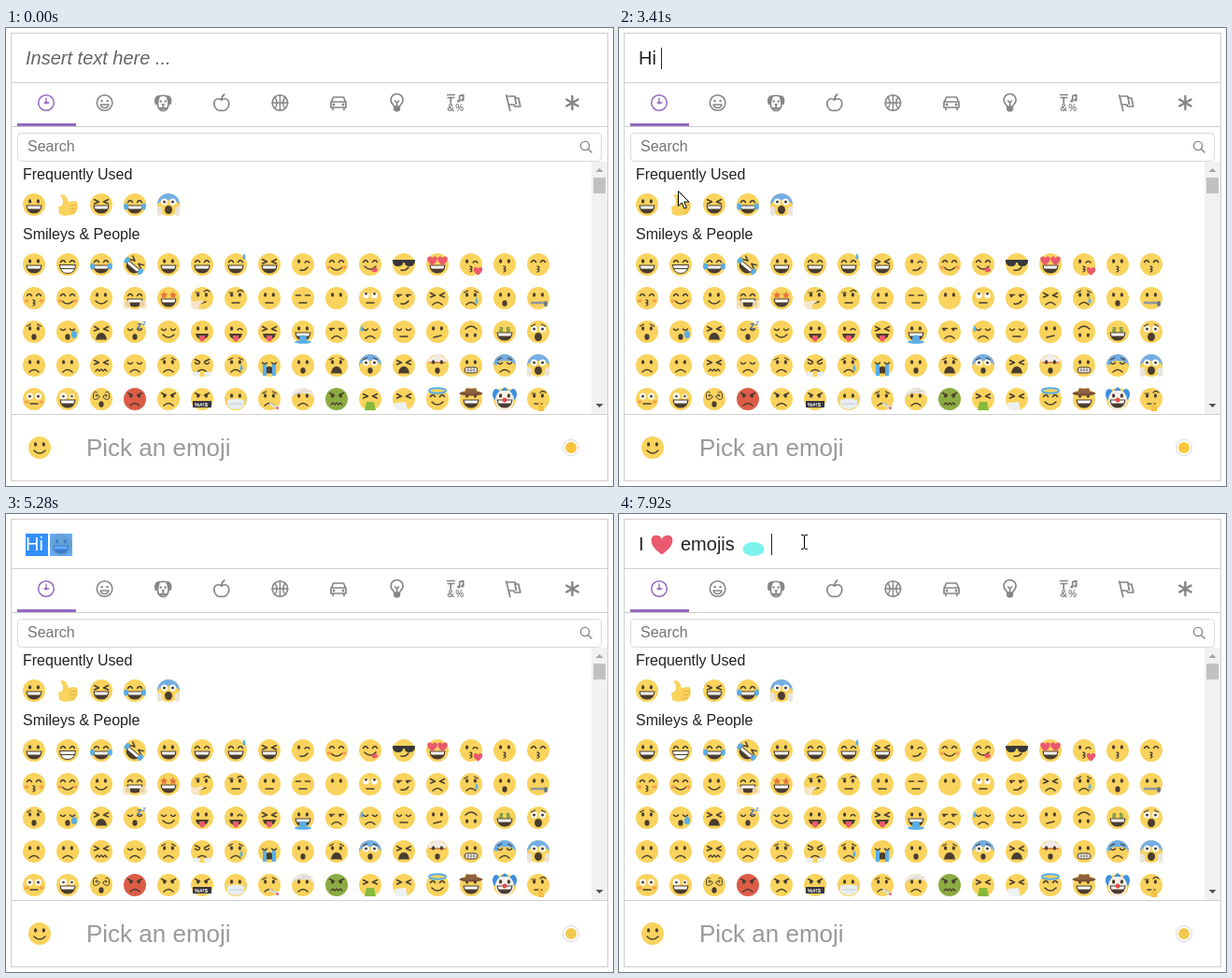
These frames come from a looping animation (650 px wide and 490 px high, 8000 ms). An HTML page:

```html
<!DOCTYPE html>
<html lang="en">
<head>
<meta charset="utf-8">
<title>Emoji picker</title>
<style>
  html, body { margin: 0; width: 100%; height: 100%; overflow: hidden; background: #fff; }
  svg { display: block; }
  text { font-family: "Liberation Sans", Arial, sans-serif; white-space: pre; }
</style>
</head>
<body>
<svg id="stage" width="650" height="490" viewBox="0 0 650 490"><g id="panel"></g><g id="live"></g></svg>
<script>
const INK = '#4a3d30', SKIN = '#f9d35d', BLUE = '#5aaee8', RED = '#ea596e', GOLD = '#dca63c', PALE = '#f6e6c8', WHITE = '#fff';

// Drawing helpers
const shape = (d, c = INK) => `<path d="${d}" fill="${c}"/>`;
const line = (d, w = 1.5, c = INK) =>
  `<path d="${d}" fill="none" stroke="${c}" stroke-width="${w}" stroke-linecap="round" stroke-linejoin="round"/>`;
const oval = (x, y, rx, ry = rx, c = INK) => `<ellipse cx="${x}" cy="${y}" rx="${rx}" ry="${ry}" fill="${c}"/>`;
const rect = (x, y, w, h, c) => `<rect x="${x}" y="${y}" width="${w}" height="${h}" fill="${c}"/>`;
const text = (x, y, size, c, s, more = '') => `<text x="${x}" y="${y}" font-size="${size}" fill="${c}" ${more}>${s}</text>`;
const at = (x, y, s, k = 1, turn = 0) => `<g transform="translate(${x} ${y}) rotate(${turn}) scale(${k})">${s}</g>`;
const both = s => s + `<g transform="scale(-1 1)">${s}</g>`;
const drop = (x, y) => shape(`M${x} ${y}c5 9-5 9 0 0z`, BLUE);
const heart = (x, y, k) => at(x, y, shape('M0 10C-14 1-12-9-6-9-3-9-1-8 0-5 1-8 3-9 6-9 12-9 14 1 0 10Z', RED), k);
const star = shape('M0-4L1.2-1.3 4-1 2 1 2.6 4 0 2.5-2.6 4-2 1-4-1-1.2-1.3Z', '#e8743a');
const mouth = 'M-8.5 .5H8.5Q8 9.5 0 9.5T-8.5 .5Z';

const parts = {
  // heads
  yellow: oval(0, 0, 12, 12, SKIN),
  red: oval(0, 0, 12, 12, '#dc5c47'),
  green: oval(0, 0, 12, 12, '#8cab42'),
  cold: shape('M-12 0A12 12 0 0 1 12 0Q9-5 0-5T-12 0Z', '#74aee6'),
  // eyes and brows
  dots: both(oval(4.4, -3.6, 1.6, 2.2)),
  arcs: line('M-7.5-2.5q2.5-4 5 0M2.5-2.5q2.5-4 5 0'),
  shut: line('M-7.5-3q2.5 3 5 0M2.5-3q2.5 3 5 0'),
  flat: line('M-7.5-3h5M2.5-3h5'),
  squint: line('M-7.5-5.5l5 2.5-5 2M7.5-5.5l-5 2.5 5 2'),
  wink: oval(-4.4, -3.4, 1.6, 2.2) + line('M2-2q2.5-3 5 0'),
  wide: both(oval(4.5, -3, 3.4, 3.4, WHITE) + oval(4.5, -3, 1.5)),
  odd: oval(-4.5, -3, 3.8, 3.8, WHITE) + oval(4.5, -3, 2.6, 2.6, WHITE) + both(oval(4.5, -3, 1.3)),
  roll: both(oval(4.5, -3, 3.2, 3.2, WHITE) + oval(4.5, -4.7, 1.4)),
  side: line('M-7.5-3.5h5M2.5-3.5h5') + oval(-5.8, -2.2, 1.4) + oval(4, -2.2, 1.4),
  spiral: both(line('M4.5-3q1.5 1 1.5-1t-3 0 1.5 4 4-4-4-3', 1)),
  cash: both(text(1.5, 0, 8, '#46843e', '$', 'font-weight="bold"')),
  hearts: both(heart(5.5, -4, 0.5)),
  stars: both(at(4.8, -3.5, star)),
  shades: shape('M-12-5H12V-3Q11 2 6 2T1-2H-1Q-1 2-6 2T-12-3Z', '#37373b'),
  mad: both(line('M7.5-6.5l-5 2.5')),
  sad: both(line('M7.5-6l-4-2', 1.2)),
  brow: line('M-7-6h4M2-7q3-3 6 0', 1.2),
  // mouths
  grin: shape(mouth) + shape('M-7.3 1.4H7.3L6.4 4.4H-6.4Z', WHITE),
  teeth: shape(mouth, WHITE) + line(mouth + 'M-7.5 4.5H7.5', 1),
  smile: line('M-6 3q6 6 12 0'),
  frown: line('M-5 7q5-5 10 0'),
  level: line('M-4 5h8'),
  smirk: line('M-3 6q5 1 8-3'),
  slant: line('M-4 6l8-2'),
  kiss: line('M-1 2q4 1 0 3q4 1 0 3', 1.3),
  round: oval(0, 5.5, 2.6, 3.2),
  big: oval(0, 5.5, 4, 4.5),
  wail: shape('M-6 8.5Q-5 1 0 1T6 8.5Z'),
  tongue: shape('M-7 2H7Q6 8 0 8T-7 2Z') + shape('M-3 4h6v4q-3 5-6 0z', RED),
  lick: line('M-6 2q6 6 12 0') + shape('M1 5l5-2q4 4 0 5t-5-3z', RED),
  grit: `<rect x="-7" y="2" width="14" height="6" rx="3" fill="#fff" stroke="${INK}"/>` + line('M-6 5H6M-3 2.5v5M0 2.5v5M3 2.5v5', 0.6),
  wave: line('M-6 6l2-2 2 2 2-2 2 2 2-2 2 2', 1.3),
  zip: line('M-7 5H6', 2.4, '#8c98a1') + oval(8, 6, 2, 3, '#6c7982'),
  // extras
  blush: both(oval(8, 3, 2.6, 1.8, '#f5a04e')),
  tears: both(oval(9.5, 2, 2.4, 3.6, BLUE)),
  streams: both(rect(3, -1, 4, 12, BLUE)),
  tear: drop(6, -1),
  sweat: drop(9, -12),
  drip: drop(-9, -7),
  drool: oval(0, 7.5, 4, 4, BLUE) + oval(0, 11, 9, 1.8, BLUE),
  bubble: oval(7, 3, 3, 4, BLUE),
  zzz: text(2, -3, 11, '#4870b9', 'z', 'font-weight="bold"') + text(8, -7, 8, '#4870b9', 'z'),
  love: heart(7.5, 7, 0.45),
  hug: both(oval(9, 7, 4, 4.5, PALE) + line('M7 5v4M9 4v4', 0.7, GOLD)),
  think: shape('M-11 3L-7 4-3 2 2 4-3 7Q-2 12-6 12T-12 8Z', PALE),
  puff: both(oval(6, 9, 4, 2.6, '#e9eef2')),
  burst: shape('M-9-3Q-12-9-5-9-4-14 0-12 4-14 5-9 12-9 9-3Z', '#f1ece8') + line('M-8-3H8', 2, '#d98b4f'),
  palms: both(oval(9.5, 7, 2.8, 5, '#e9e3da')),
  censor: rect(-10, 2, 20, 7, '#35353a') + text(-8, 8, 6, WHITE, '%#!$', 'font-weight="bold"'),
  mask: shape('M-9 1Q0-2 9 1V7Q0 15-9 7Z', '#e8eef1') + line('M-12-1L-9 2M12-1L9 2M-7 5H7', 0.8, '#b7c5cf'),
  stick: line('M1 5L9 10', 2.2, '#d7dfe4') + oval(8.5, 9.7, 1.4, 1.4, RED),
  bandage: shape('M-12-2Q-10-12 0-12T12-2L7-6H-7Z', '#eeeae5') + line('M-10-4L4-11M-6-6L9-9', 0.7, '#cfc8c0'),
  sick: shape('M-4 3h8l2 9h-12z', '#86ba3c'),
  tissue: shape('M-10 4L2 3 4 12-8 12Z', '#edf1f3'),
  halo: `<ellipse cy="-9" rx="9" ry="2.7" fill="none" stroke="${BLUE}" stroke-width="2"/>`,
  hat: oval(0, -6, 12.5, 2.4, '#7b5138') + shape('M-7-6L-5-12Q0-10 5-12L7-6Z', '#8f6142'),
  clown: both(oval(9, -5, 4, 6, '#3f8fe0')) + oval(0, 1, 10, 11, '#f7efe8') + shape('M-4-9L0-13 4-9Z', '#3f8fe0'),
  nose: oval(0, 1, 2.5, 2.5, '#e34b4b'),
  hush: shape('M0 3h3v4q5 1 3 6h-6z', '#f4c249'),
  thumb: shape('M-10 2Q-6 2-5-2-5-8-8-10-4-13-1-8L1-3 8-4Q12-3 10 0 12 2 10 4 11 7 8 8 8 11 4 11L-4 12-9 10Z', SKIN)
    + line('M3 1L10 0M3 4.5L10 4M3 8L8 8', 0.8, GOLD)
};

// One emoji per entry: name, then parts; a leading head replaces the yellow one
const rows = `grinning_face dots grin,grin arcs teeth,joy arcs grin tears,rofl squint grin tears tilt,smiley dots grin,smile arcs grin,sweat_smile arcs grin sweat,laughing squint grin,wink wink smirk,blush arcs smile blush,yum arcs lick,sunglasses shades smirk,heart_eyes grin hearts,kissing_heart wink kiss love,kissing dots kiss,kissing_smiling_eyes arcs kiss
kissing_closed_eyes arcs kiss blush,relaxed arcs smile blush,slightly_smiling_face dots smile,hugging_face arcs grin hug,star_struck stars grin,thinking_face dots brow slant think,raised_eyebrow dots brow level,neutral_face dots level,expressionless flat level,no_mouth dots,rolling_eyes roll level,smirk side smirk,persevere squint frown,disappointed_relieved dots sad frown tear,open_mouth dots round,zipper_mouth dots zip
hushed dots sad round,sleepy shut round bubble,tired_face squint wail,sleeping shut round zzz,relieved shut smile,stuck_out_tongue dots tongue,winking_tongue wink tongue,squinting_tongue squint tongue,drooling_face dots grin drool,unamused side frown,sweat shut frown drip,pensive shut level,confused dots slant,upside_down dots smile flip,money_mouth cash grin,astonished wide sad big
frowning dots frown,slightly_frowning dots frown,confounded squint wave,disappointed shut frown,worried dots sad frown,triumph shut mad frown puff,cry dots sad frown tear,sob shut wail streams,frowning_open dots round,anguished dots sad wail,fearful cold wide sad round,weary squint wail,exploding_head burst dots round,grimacing dots grit,cold_sweat cold shut sad frown drip,scream cold wide big palms
flushed wide level blush,zany_face odd grin,dizzy_face spiral round,red rage dots mad frown,angry dots mad frown,cursing_face dots mad censor,mask dots mask,thermometer_face dots sad frown stick,head_bandage dots frown bandage,green nauseated_face dots mad wave,vomiting_face squint sick,sneezing_face squint tissue,innocent arcs smile halo,cowboy dots grin hat,clown_face clown dots grin nose,lying dots brow level hush`
  .split('\n').map(r => r.split(','));

const faces = {};
const cells = [];
rows.forEach((row, j) => row.forEach((entry, i) => {
  const words = entry.split(' ');
  const head = /^(red|green) /.test(entry) ? words.shift() : 'yellow';
  const name = words.shift();
  const turn = words.includes('tilt') ? 40 : words.includes('flip') ? 180 : 0;
  faces[name] = at(0, 0, [head, ...words].map(w => parts[w] || '').join(''), 1, turn);
  cells.push([name, 30 + 36 * i, 253 + 36 * j]);
}));
faces.thumbs_up = parts.thumb;
['grinning_face', 'thumbs_up', 'laughing', 'joy', 'scream'].forEach((n, i) => cells.push([n, 30 + 36 * i, 189]));

// Category tabs
const GREY = '#858585', PURPLE = '#9469c2';
const ring = (c, w) => `<circle r="8.3" fill="none" stroke="${c}" stroke-width="${w}"/>`;
const gl = (d, w = 1.7) => line(d, w, GREY);
const gd = (x, y, r = 1.2) => oval(x, y, r, r, GREY);
const icons = [
  ring(PURPLE, 1.5) + line('M0-5V0M-2 0H3', 1.3, PURPLE) + oval(0, 0, 1.4, 1.4, PURPLE),
  ring(GREY, 1.6) + both(gd(3, -2)) + gl('M-4.5 2H4.5Q3.5 5.5 0 5.5T-4.5 2Z', 1.4),
  gl('M-4-7Q0-8.5 4-7Q7 1 5 5 3 8.5 0 8.5T-5 5Q-7 1-4-7M-2.5 5.5Q0 7 2.5 5.5M0 3V5')
    + both(shape('M4-8Q10-8 9 0 8 4 6 1Z', GREY) + gd(2.5, -1.5)) + shape('M-2 1H2L0 4Z', GREY),
  gl('M0-3C-5-6-8-3-8 1S-4 10 0 8C4 10 8 5 8 1S5-6 0-3Q0-7 3-9'),
  ring(GREY, 1.6) + gl('M-8 0H8M0-8V8M-5.5-6Q-1 0-5.5 6M5.5-6Q1 0 5.5 6', 1.4),
  gl('M-8 5V0L-5.5-6H5.5L8 0V5ZM-8-1H8M-6 5V7.5M6 5V7.5') + both(gd(5, 2, 1.4)),
  gl('M-3 4C-3 2-6.5 1-6.5-3A6.5 6.5 0 0 1 6.5-3C6.5 1 3 2 3 4ZM0 3V0L-2-2M0 0L2-2') + shape('M-3.5 4H3.5V8L1.5 9.5H-1.5L-3.5 8Z', GREY),
  gl('M-8.5-8.5H-1M-8-5.5H-1.5M-5-5V0M4.5-2V-7.5L8.5-8.5V-3') + gd(3.5, -2, 1.6) + gd(7.5, -3, 1.6)
    + text(-9, 9, 11, GREY, '&amp;', 'font-weight="bold"') + text(0, 9, 10, GREY, '%', 'font-weight="bold"'),
  gl('M-8-8L-4 8.5M-7.5-7H1L2-5H5L7 4H1L0 2H-5.5M1-7L2.5 1.5'),
  gl('M0-7V7M-6.2-3.5L6.2 3.5M6.2-3.5L-6.2 3.5', 2.4)
];

const EDGE = '#cfcfcf';
panel.innerHTML = `<rect x="5.5" y="5.5" width="639" height="479" fill="#fff" stroke="${EDGE}"/>`
  + [58, 105, 413].map(y => rect(6, y, 638, 1, EDGE)).join('')
  + rect(12, 102, 63, 3, PURPLE)
  + icons.map((s, i) => at(43 + 62.6 * i, 80, s)).join('')
  + `<rect x="12.5" y="112.5" width="625" height="30" rx="4" fill="#fff" stroke="#d9d9d9"/>`
  + text(23, 132, 16, '#757575', 'Search')
  + `<circle cx="620" cy="126" r="4.6" fill="none" stroke="${GREY}" stroke-width="1.3"/>` + gl('M623.5 129.5L627 133', 1.5)
  + text(18, 162, 16, '#222', 'Frequently Used') + text(18, 226, 16, '#222', 'Smileys &amp; People')
  + rect(627, 143, 17, 270, '#f1f1f1') + rect(629, 160, 13, 17, '#c1c1c1')
  + shape('M631.5 154L635.5 150 639.5 154Z', '#a3a3a3') + shape('M631.5 402L635.5 406 639.5 402Z', '#505050')
  + cells.map(([n, x, y]) => at(x, y, faces[n])).join('');

// Pointer path: time, x, y
const path = [
  [80, 330, 385], [310, 300, 200], [690, 256, 34], [840, 256, 34], [850, 262, 37], [2940, 262, 37],
  [2950, 250, 40], [3200, 130, 100], [3410, 63, 174], [3730, 31, 190], [4180, 31, 190], [4190, 50, 168],
  [4265, 90, 129], [4500, 100, 60], [4960, 74, 30], [5050, 60, 27], [5280, -10, 18], [6590, -10, 24],
  [6600, 12, 24], [6990, 110, 22], [7215, 159, 23], [7380, 185, 26], [7900, 198, 30], [8000, 198, 30]
];
const last = (list, t) => list.filter(s => s <= t).pop();

function stepped(t) {
  const start = last([0, 80, 850, 2950, 4190, 5050, 6600], t);
  return start + Math.floor((t - start) / 77.2 + 0.1) * 77.2;
}
function pointer(t) {
  if (t < 80) return [-50, 30];
  const q = Math.min(7999, Math.max(80, stepped(t)));
  const i = path.findIndex(k => k[0] > q);
  const [a, b] = [path[i - 1], path[i]], u = (q - a[0]) / (b[0] - a[0]);
  return [1, 2].map(n => Math.round(a[n] + (b[n] - a[n]) * u));
}

const arrow = '<path d="M.5 .5V16.5L4.3 13 7 19 9.4 18 6.8 12H12Z" fill="#fff" stroke="#000"/>';
const beam = line('M-2.5-7.5H-1M2-7.5H3.5M-1-7.5L.5-6.5 2-7.5M.5-6.5V6.5M.5 6.5L-1 7.5H-2.5M.5 6.5L2 7.5H3.5', 1, '#000');
const party = ['#ff8d8b', '#fed689', '#88ff89', '#7df3ee', '#8bb5fe', '#d78cff', '#ff8cff', '#ff68f7', '#fe6cb7', '#df4b4d'];

function entry(t, x) {
  const type = s => text(21, 39, 20, '#222', s);
  if (t < 1870) return text(21, 39, 20, '#646464', 'Insert text here ...', 'font-style="italic"');
  if (t >= 6600) return type('I') + heart(46, 32.5, 1.08) + text(66, 39, 20, '#222', 'emojis')
    + oval(144, 37.5, 11.5, 7.5, party[(Math.floor(t / 50) + 5) % 10]);
  const word = type(t < 2180 ? 'H' : 'Hi');
  if (t < 3880) return word;
  const face = at(59, 33, faces.grinning_face);
  if (t < 5050) return word + face;
  const left = Math.max(21, Math.min(71, x)), hue = '#3390ff';
  return rect(left, 21, Math.max(0, 45 - left), 24, hue)
    + (left < 35 ? text(21, 39, 20, WHITE, 'Hi') : word) + face
    + `<g opacity=".75">${rect(Math.max(47, left), 21, Math.min(24, 71 - left), 24, hue)}</g>`;
}

function caret(t) {
  const typed = last([870, 1870, 2180, 2270, 3880, 6600], t);
  if (!typed || (t >= 5050 && t < 6600) || Math.floor((t - typed) / 530) % 2) return '';
  const x = t < 1870 ? 21 : t < 2180 ? 35 : t < 2250 ? 40 : t < 3880 ? 45 : t < 6600 ? 70 : 163;
  return rect(x, 21, 1, 23, '#222');
}

// Shows the emoji under the pointer, or the idle prompt
function footer(x, y, t) {
  const hit = cells.find(c => Math.abs(c[1] - x) <= 12 && Math.abs(c[2] - y) <= 12);
  if (!hit) return at(36, 449, faces.slightly_smiling_face) + text(86, 458, 26, '#999a9c', 'Pick an emoji')
    + `<circle cx="605" cy="449" r="8.5" fill="#fff" stroke="#d8d8d8"/>`
    + oval(605, 449, 6, 6, t < 80 ? '#f7c23c' : t < 4190 ? '#ffc83d' : '#f2c94f');
  const name = hit[0].replace(/_/g, ' ').replace(/\b\w/g, c => c.toUpperCase());
  return at(36, 449, faces[hit[0]]) + text(86, 447, 14, '#222', name) + text(86, 464, 12, '#888', `:${hit[0]}:`);
}

const began = performance.now();
function draw() {
  const t = (performance.now() - began) % 8000, [x, y] = pointer(t);
  const overText = y < 58 || (y > 112 && y < 143);
  live.innerHTML = entry(t, x) + caret(t) + footer(x, y, t) + at(x, y, overText ? beam : arrow);
  requestAnimationFrame(draw);
}
draw();
</script>
</body>
</html>
```
